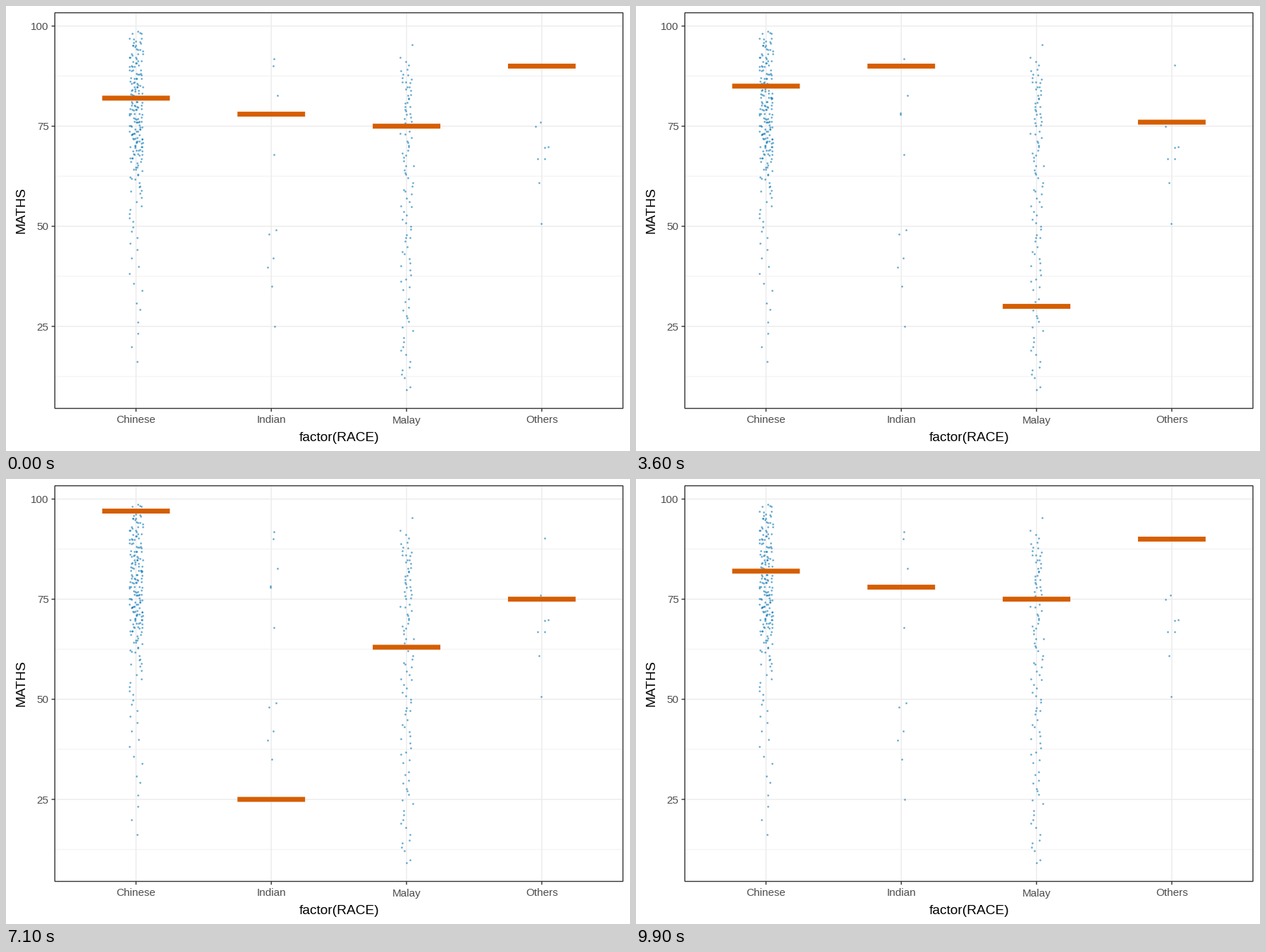
Animation, 885 px wide and 632 px high, one loop 10 s. Source, as a matplotlib script:

```python
import numpy as np
import matplotlib.pyplot as plt
from matplotlib.animation import FuncAnimation
from matplotlib.patches import Rectangle

W, H, DPI = 885, 632, 100
PX = 72 / DPI  # points per pixel
LEFT, RIGHT, TOP, BOTTOM = 69.3, 875, 9.6, 571.5
BLUE, ORANGE, GRID, DARK, GREY = "#0072B2", "#D55E00", "#EBEBEB", "#333333", "#4D4D4D"
FONT = "Liberation Sans"
GROUPS = ["Chinese", "Indian", "Malay", "Others"]
STEP = (RIGHT - LEFT) / 4.2
CENTRES = LEFT + STEP * (0.6 + np.arange(4))
BAR_W, BAR_H = STEP / 2, 7

# Key poses: the score each group's bar rests on, draw by draw
DRAWS = np.array([
    [82, 78, 75, 90], [79, 92, 52, 70], [74, 68, 65, 75], [67, 48, 79, 61],
    [47, 78, 58, 61], [72, 42, 63, 61], [77, 48, 87, 67], [84, 48, 84, 70],
    [79, 35, 65, 70], [85, 90, 30, 76], [91, 78, 65, 75], [86, 68, 79, 67],
    [76, 48, 54, 67], [90, 35, 65, 67], [79, 68, 60, 67], [84, 92, 90, 75],
    [86, 40, 9, 70], [93, 68, 58, 67], [97, 25, 63, 75], [80, 78, 87, 61],
    [44, 68, 63, 61], [90, 78, 44, 75], [80, 83, 22, 67], [74, 90, 63, 70],
    [91, 25, 65, 76]])

rng = np.random.default_rng(7)


def y_px(score):
    return 28.5 + (100 - score) * 5.687


def jittered(centre, scores):
    scores = np.round(scores)
    x = centre + rng.uniform(-0.05, 0.05, scores.size) * STEP
    return np.column_stack([x, y_px(scores + rng.uniform(-0.3, 0.3, scores.size))])


# Quantile curves give the two large groups; the small ones are short lists
u, v = np.linspace(0, 1, 205), np.linspace(0, 1, 106)
SCORES = [
    99 - 38 * u**0.8 - 45 * u**16,
    np.array([92, 90, 83, 78, 78, 68, 49, 48, 42, 40, 35, 25]),
    95 - 20 * v**0.4 - 66 * v**1.9,
    np.array([90, 76, 75, 70, 70, 67, 67, 61, 51])]

fig = plt.figure(figsize=(W / DPI, H / DPI), dpi=DPI, facecolor="white")
ax = fig.add_axes([0, 0, 1, 1])
ax.set_xlim(0, W)
ax.set_ylim(H, 0)
ax.axis("off")


def line(x, y, color, width=1.4):
    ax.plot(x, y, color=color, lw=width * PX, solid_capstyle="butt", snap=False, zorder=1)


def label(x, y, text, size, color, ha="center", rotation=0):
    ax.text(x, y, text, fontsize=size * PX, color=color, family=FONT, ha=ha,
            va="baseline", rotation=rotation, rotation_mode="anchor")


for score in (87.5, 62.5, 37.5, 12.5):
    line([LEFT, RIGHT], [y_px(score)] * 2, GRID, 0.7)
for score in (100, 75, 50, 25):
    y = y_px(score)
    line([LEFT, RIGHT], [y, y], GRID)
    line([LEFT - 4.7, LEFT], [y, y], DARK)
    label(60.7, y + 5.6, str(score), 15.3, GREY, ha="right")
for x, name in zip(CENTRES, GROUPS):
    line([x, x], [TOP, BOTTOM], GRID)
    line([x, x], [BOTTOM, BOTTOM + 4.7], DARK)
    label(x, 592.5, name, 15.3, GREY)
label((LEFT + RIGHT) / 2, 618, "factor(RACE)", 19.2, "black")
label(26, (TOP + BOTTOM) / 2, "MATHS", 19.2, "black", rotation=90)

points = np.vstack([jittered(c, s) for c, s in zip(CENTRES, SCORES)])
ax.scatter(*points.T, s=(2.7 * PX) ** 2, color=BLUE, alpha=0.6, linewidths=0, zorder=2)

bars = [ax.add_patch(Rectangle((x - BAR_W / 2, 0), BAR_W, BAR_H, fc=ORANGE, lw=0,
                               snap=False, zorder=3)) for x in CENTRES]
ax.add_patch(Rectangle((LEFT, TOP), RIGHT - LEFT, BOTTOM - TOP, fill=False,
                       ec=DARK, lw=1.4 * PX, snap=False, zorder=4))


def scores_at(frame):
    # Each draw holds three frames, then one halfway frame; one hold is a frame short
    draw, phase = divmod(frame + (frame >= 50), 4)
    now, following = DRAWS[draw % len(DRAWS)], DRAWS[(draw + 1) % len(DRAWS)]
    return (now + following) / 2 if phase == 3 else now


def update(frame):
    for bar, score in zip(bars, scores_at(frame)):
        bar.set_y(y_px(score) - BAR_H / 2)
    return bars


anim = FuncAnimation(fig, update, frames=100, interval=100, repeat=True,
                     repeat_delay=0, blit=False)
plt.show()
```
